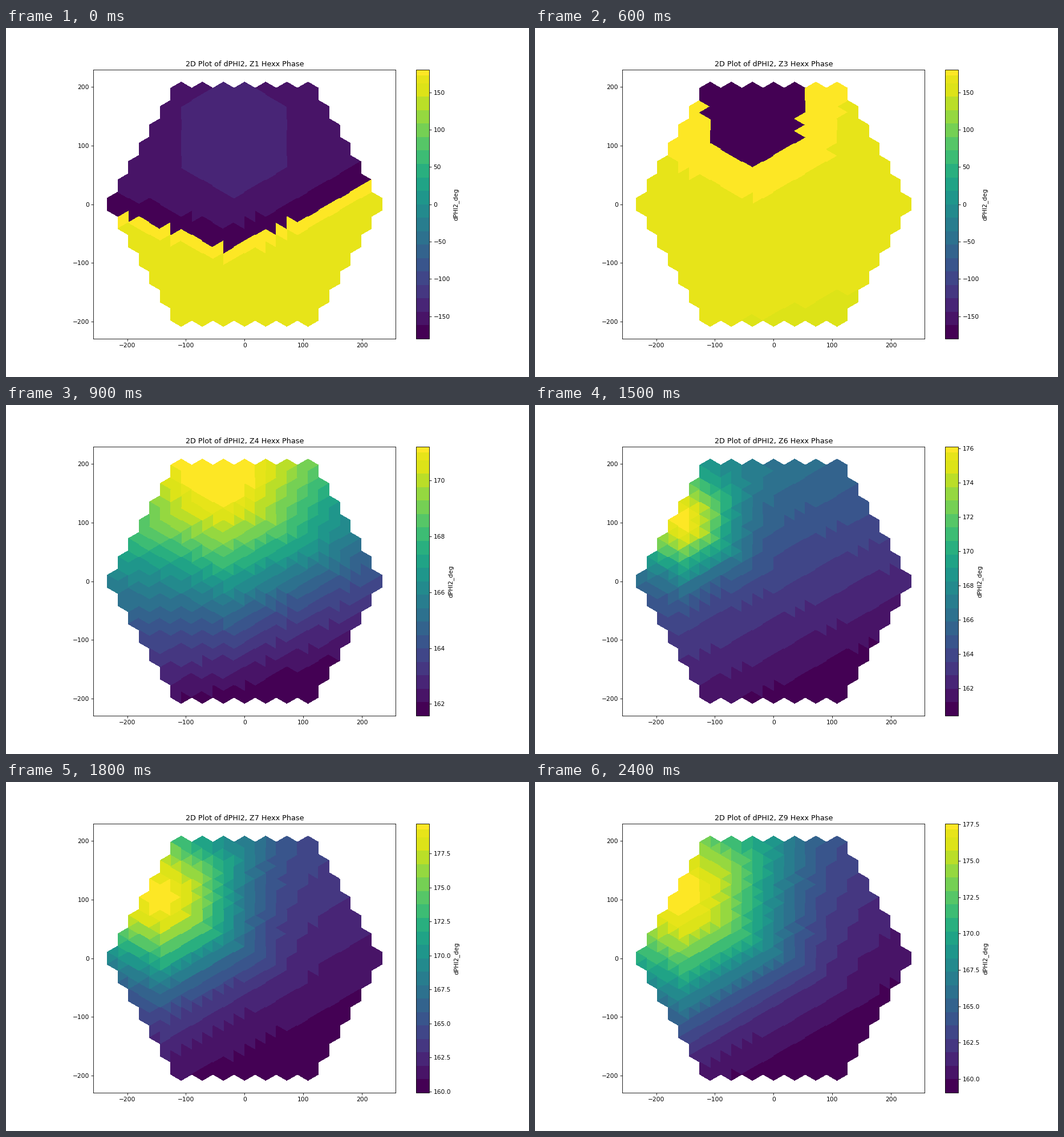
A matplotlib script for the animation above (2.7 s loop, 917x611 px).

```python
import numpy as np
import matplotlib.pyplot as plt
from matplotlib.animation import FuncAnimation
from matplotlib.colors import ListedColormap
from matplotlib.tri import Triangulation

DPI = 76.4
PITCH = 36.0
RINGS = 6
FULL_CIRCLE = (-180, 180)


def hex_centers():
    """Centres of a hexagonal block of cells, row by row."""
    return [np.array([PITCH * (i - (2 * RINGS - abs(k)) / 2), PITCH * k * np.sqrt(3) / 2])
            for k in range(-RINGS, RINGS + 1)
            for i in range(2 * RINGS + 1 - abs(k))]


def hex_mesh():
    """Split every hexagonal cell into six triangles."""
    angles = np.radians(30 + 60 * np.arange(6))
    corners = PITCH / np.sqrt(3) * np.column_stack([np.cos(angles), np.sin(angles)])
    points, triangles = [], []
    for n, center in enumerate(hex_centers()):
        points += [center, *(center + corners)]
        triangles += [(7 * n, 7 * n + 1 + j, 7 * n + 1 + (j + 1) % 6) for j in range(6)]
    points = np.array(points)
    return Triangulation(points[:, 0], points[:, 1], triangles)


def banded_viridis():
    """Twenty flat bands, the last one with a narrow bright tip."""
    steps = np.arange(100)
    shades = (steps // 5) / 19
    shades[95:98] = 0.962
    return ListedColormap(plt.get_cmap("viridis")(shades))


mesh = hex_mesh()
x = mesh.x[mesh.triangles].mean(axis=1)
y = mesh.y[mesh.triangles].mean(axis=1)


def bump(x0, y0, width):
    """Bell whose contours are hexagons aligned with the cells."""
    angles = np.radians([[0], [60], [120]])
    distance = np.abs((x - x0) * np.cos(angles) + (y - y0) * np.sin(angles)).max(axis=0)
    return np.exp(-0.5 * (distance / width) ** 2)


def plane(level, slope_x, slope_y):
    return level + slope_x * x + slope_y * y


def mix(a, b, t=0.5):
    return (1 - t) * a + t * b


def wrapped(degrees):
    return ((degrees + 180) % 360 - 180, *FULL_CIRCLE)


def scaled(fraction, low, high):
    return low + np.clip(fraction, 0, 1) * (high - low), low, high


# Unwrapped phase in degrees: a V-shaped front, later a single peak
front = y + 49 - 0.32 * np.abs(x + 30) - 0.07 * x
z1 = 163 + 34 / (1 + np.exp(-front / 18)) + 26 * bump(-20, 110, 115)
z3 = plane(166, -0.006, 0.022) + 16.5 * bump(-28, 140, 85)

# Phase as a fraction of the colour range
z4 = plane(0.30, -0.0004, 0.0015) + 0.47 * bump(-30, 150, 110)
z6 = plane(0.21, -0.0004, 0.0009) + 0.64 * bump(-155, 100, 55)
z7 = plane(0.14, -0.0003, 0.0006) + 0.77 * bump(-140, 98, 87)
z9 = plane(0.13, -0.0003, 0.0006) + 0.78 * bump(-155, 100, 110)
z5 = mix(z4, z6)

LAYERS = [
    wrapped(z1),
    wrapped(mix(z1, z3, 0.7)),
    wrapped(z3),
    scaled(z4, 161.585, 171.2),
    scaled(z5 / z5.max(), 160.85, 169.75),
    scaled(z6, 160.39, 176.1),
    scaled(z7, 159.92, 179.67),
    scaled(mix(z7, z9), 159.49, 178.6),
    scaled(z9, 159.07, 177.53),
]

fig, ax = plt.subplots(figsize=(917 / DPI, 611 / DPI), dpi=DPI)
cells = ax.tripcolor(mesh, facecolors=LAYERS[0][0], cmap=banded_viridis())
ax.set_aspect("equal")
fig.colorbar(cells, ax=ax, label="dPHI2_deg")
title = ax.set_title("")


def update(i):
    values, low, high = LAYERS[i]
    cells.set_array(values)
    cells.set_clim(low, high)
    title.set_text(f"2D Plot of dPHI2, Z{i + 1} Hexx Phase")
    return cells, title


anim = FuncAnimation(fig, update, frames=len(LAYERS), interval=300, repeat=True,
                     repeat_delay=0, blit=False)
plt.show()
```
